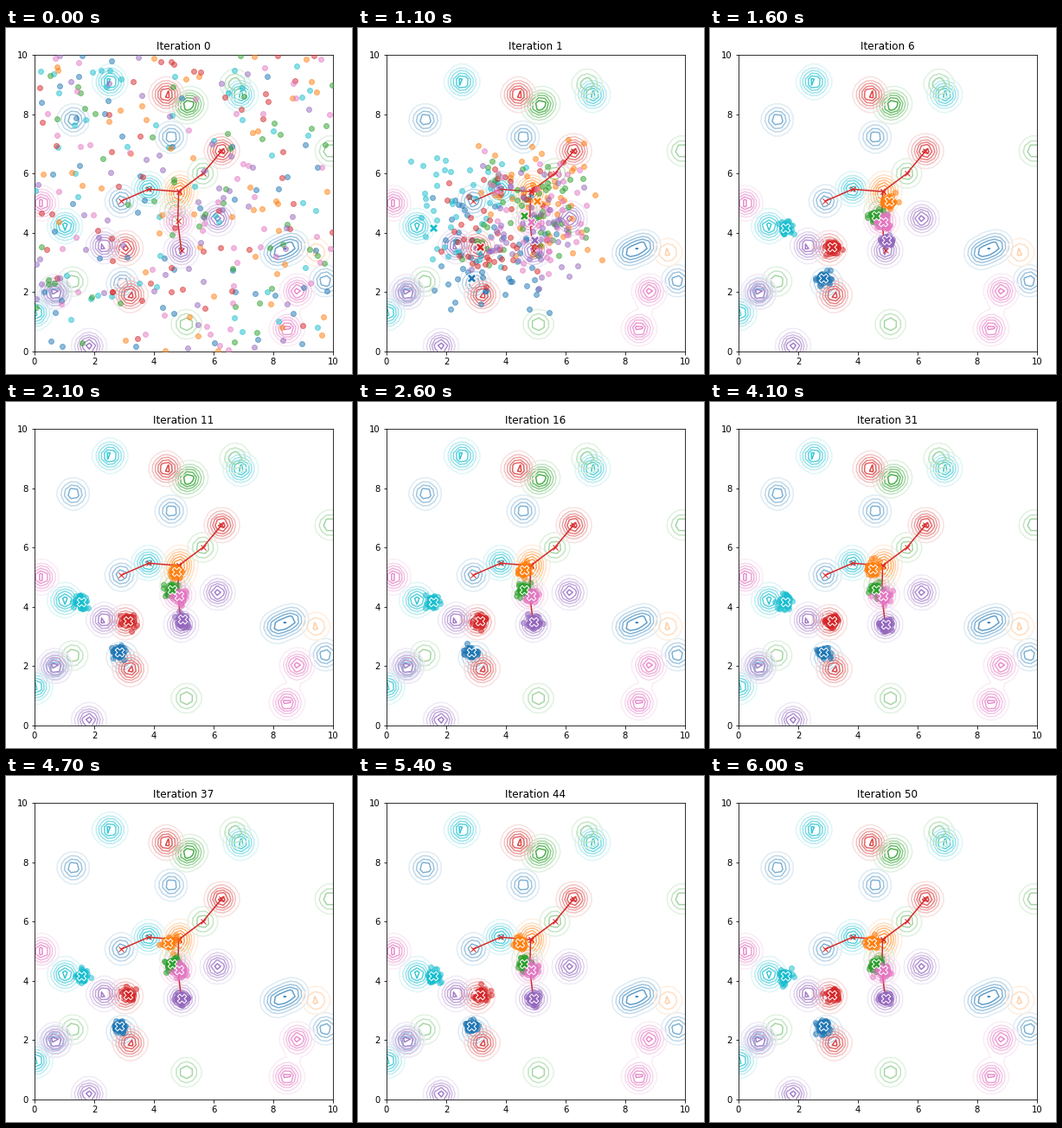
Animation, 400 px wide and 400 px high, one loop 7100 ms. Source, as a matplotlib script:

```python
import numpy as np
import matplotlib.pyplot as plt
from matplotlib.animation import FuncAnimation
from matplotlib.colors import LinearSegmentedColormap

SIZE, DPI = 400, 72
LEFT, BOTTOM, RIGHT, TOP = 33, 26, 378, 369
STEP_MS, HOLD, ITERATIONS = 100, 11, 50
PARTICLES = 50
SIGMA = 0.3    # width of every peak
JITTER = 0.11  # spread of a settled swarm

# Reward peaks of each agent; the first one is its place on the best tree.
PEAKS = {
    "blue": [(2.91, 5.07), (1.30, 7.81), (4.58, 7.23), (8.10, 3.32),
             (8.65, 3.56), (0.70, 1.96), (2.95, 2.29), (9.75, 2.38)],
    "cyan": [(3.82, 5.47), (2.53, 9.09), (6.90, 8.66), (1.02, 4.22),
             (0.03, 1.31)],
    "orange": [(4.83, 5.39), (4.90, 5.55), (4.80, 4.98), (9.43, 3.34)],
    "green": [(5.64, 6.00), (6.72, 9.01), (5.04, 8.23), (5.27, 8.38),
              (9.90, 6.76), (1.28, 2.36), (5.09, 0.92), (4.71, 4.74)],
    "red": [(6.27, 6.76), (4.42, 8.66), (3.04, 3.49), (3.20, 1.91)],
    "pink": [(4.80, 4.39), (0.23, 5.00), (8.81, 2.03), (8.46, 0.77)],
    "purple": [(4.92, 3.40), (1.82, 0.18), (2.33, 3.56), (6.14, 4.48),
               (0.68, 2.00)],
}
BRANCHES = ["blue cyan orange green red", "orange pink purple"]

# Where each swarm settles; two of them arrive late from an offset.
SETTLED = {"blue": (2.83, 2.47), "cyan": (1.56, 4.17), "orange": (4.47, 5.29),
           "green": (4.60, 4.58), "red": (3.14, 3.53), "pink": (4.85, 4.37),
           "purple": (4.92, 3.40)}
LATE = {"orange": (0.56, -0.22), "purple": (0.05, 0.36)}


def field(peaks, gx, gy):
    return sum(np.exp(-((gx - x) ** 2 + (gy - y) ** 2) / (2 * SIGMA ** 2))
               for x, y in peaks)


def swarm_center(name, iteration):
    drift = np.array(LATE.get(name, (0, 0)))
    return SETTLED[name] + drift * np.exp(-max(iteration - 6, 0) / 7)


class Swarm:
    def __init__(self, ax, name, seed):
        self.name, self.seed = name, seed
        rng = np.random.default_rng(seed)
        self.start = rng.uniform(0, 10, (PARTICLES, 2))
        self.rate = rng.uniform(0.25, 0.45, (PARTICLES, 1))
        color = f"tab:{name}"
        self.dots = ax.scatter([], [], s=36, color=color, alpha=0.5, zorder=3)
        self.best = ax.scatter([], [], s=110, marker="X", color=color,
                               edgecolors="white", linewidths=1, zorder=4)

    def update(self, iteration):
        self.best.set_visible(iteration > 0)
        if iteration == 0:
            self.dots.set_offsets(self.start)
            return
        rng = np.random.default_rng([self.seed, iteration])
        center = swarm_center(self.name, iteration)
        noise = rng.normal(0, JITTER, self.start.shape)
        pull = self.rate ** iteration
        self.dots.set_offsets(center + (self.start - center) * pull + noise)
        self.best.set_offsets([center])


fig = plt.figure(figsize=(SIZE / DPI, SIZE / DPI), dpi=DPI, facecolor="white")
ax = fig.add_axes([LEFT / SIZE, BOTTOM / SIZE,
                   (RIGHT - LEFT) / SIZE, (TOP - BOTTOM) / SIZE])
ax.set(xlim=(0, 10), ylim=(0, 10))
title = ax.set_title("Iteration 0", fontsize=12)

gx, gy = np.meshgrid(np.linspace(0, 10, 50), np.linspace(0, 10, 50))
for name, peaks in PEAKS.items():
    fade = LinearSegmentedColormap.from_list(name, ["white", f"tab:{name}"])
    ax.contour(gx, gy, field(peaks, gx, gy), cmap=fade, zorder=1)

for branch in BRANCHES:
    nodes = [PEAKS[name][0] for name in branch.split()]
    ax.plot(*zip(*nodes), color="tab:red", marker="x", lw=1.5, zorder=2)

swarms = [Swarm(ax, name, seed) for seed, name in enumerate(PEAKS, 11)]


def update(frame):
    iteration = min(max(frame - HOLD + 1, 0), ITERATIONS)
    title.set_text(f"Iteration {iteration}")
    for swarm in swarms:
        swarm.update(iteration)


anim = FuncAnimation(fig, update, frames=ITERATIONS - 1 + 2 * HOLD,
                     interval=STEP_MS, repeat=True, repeat_delay=0)
plt.show()
```
